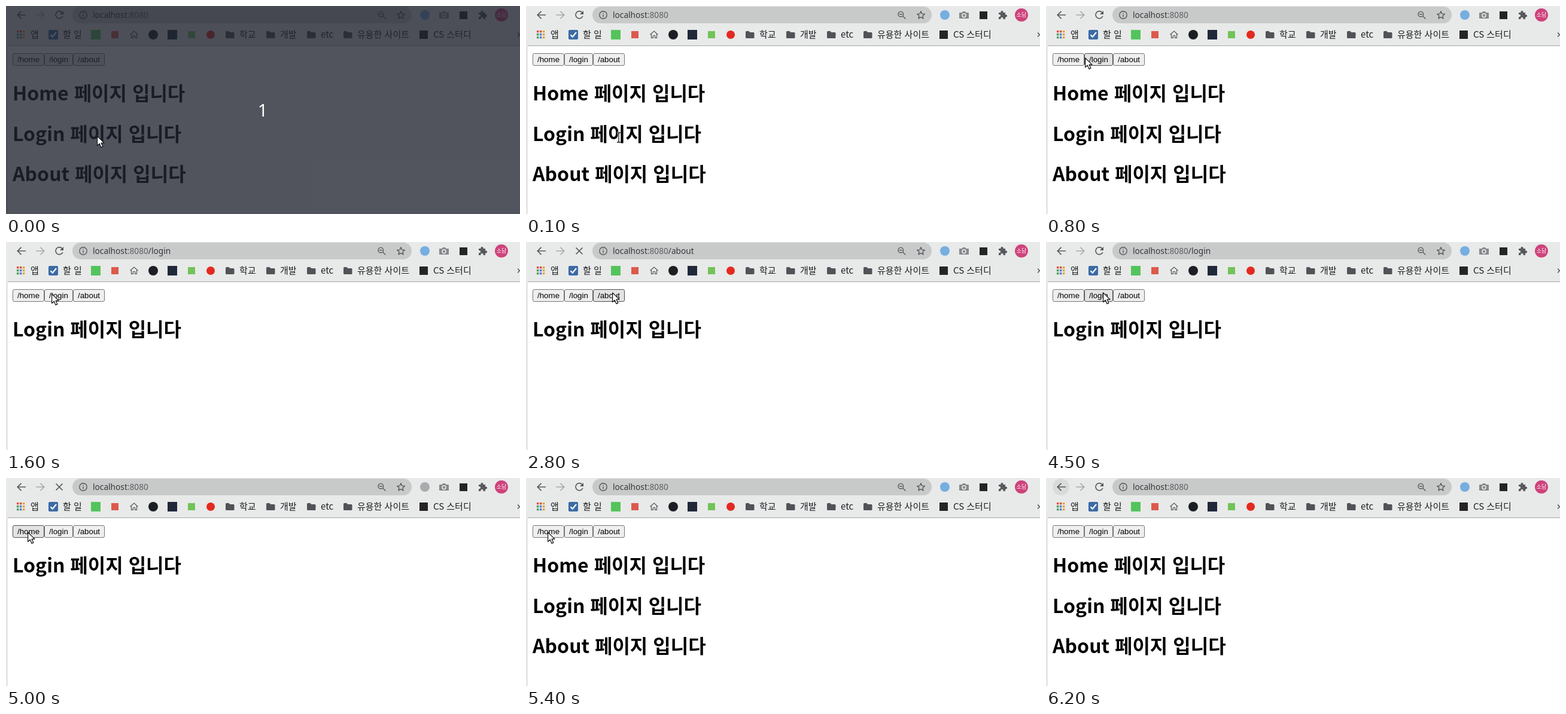
Animation of 859x348 px, one loop 6.5 s. Source, as an HTML page:

```html
<!DOCTYPE html>
<html lang="ko">
<head>
<meta charset="utf-8">
<title>Page routing</title>
<style>
  html, body { margin: 0; width: 100%; height: 100%; overflow: hidden; background: #fff; }
  svg { display: block; }
  text { white-space: pre; }
  .url { font: 13.7px "Noto Sans", sans-serif; fill: #33363a; }
  .mark { font: 15px "Noto Sans CJK KR", "Noto Sans CJK", sans-serif; fill: #1c1d1f; }
  .button { font: 13.333px "Liberation Sans", Arial, sans-serif; fill: #000; }
  .title { font: bold 32px "Noto Sans CJK KR", "Noto Sans CJK", sans-serif; fill: #000; }
  .count { font: 29px "Noto Sans", sans-serif; fill: #fff; text-anchor: middle; }
  .badge { font: 9px "Noto Sans CJK KR", "Noto Sans CJK", sans-serif; fill: #fff; text-anchor: middle; }
  .line { fill: none; stroke: #55585c; stroke-width: 1.7; }
</style>
</head>
<body>
<svg id="stage" width="859" height="348" viewBox="0 0 859 348">
  <rect width="859" height="348" fill="#fff"/>
  <rect width="3" height="348" fill="#e6e6e6"/>
  <rect width="859" height="66" fill="#e8e9e9"/>
  <rect y="66" x="3" width="856" height="1" fill="#a3a4a5"/>

  <!-- Toolbar -->
  <circle id="backHover" cx="25" cy="15" r="14" fill="#d9dada"/>
  <path class="line" d="M33 15H19.5M25.5 8.8L19.3 15L25.5 21.2"/>
  <path class="line" d="M50 15H63.5M57.5 8.8L63.7 15L57.5 21.2" style="stroke:#a9abad"/>
  <g id="reload">
    <path class="line" d="M93.6 10.7A6.1 6.1 0 1 0 94.8 17"/>
    <path d="M96 8V14H90Z" fill="#55585c"/>
  </g>
  <path id="stop" class="line" d="M83.5 9.5L94.5 20.5M94.5 9.5L83.5 20.5"/>
  <rect x="111" y="1" width="567" height="28" rx="14" fill="#c8caca"/>
  <g class="line" style="stroke-width:1.4">
    <circle cx="129" cy="15" r="6.2"/>
    <path d="M129 14V18.4M129 11.3V12.8"/>
    <circle cx="626.3" cy="13.7" r="4.3"/>
    <path d="M629.6 17L634.5 21.5M624 13.7H628.6"/>
    <path d="M660 8.8L661.8 13.1L666.4 13.5L662.9 16.5L664 21L660 18.6L656 21L657.1 16.5L653.6 13.5L658.2 13.1Z" stroke-linejoin="round"/>
  </g>
  <text class="url" x="145" y="20">localhost<tspan fill="#5c5f63">:8080</tspan><tspan id="path"></tspan></text>
  <circle id="extension" cx="700" cy="15" r="8"/>
  <path d="M725 11H728.5L730 9H734L735.5 11H739Q740 11 740 12V20Q740 21 739 21H725Q724 21 724 20V12Q724 11 725 11Z" fill="#85888b"/>
  <circle cx="732" cy="15.8" r="3" fill="#85888b" stroke="#eee" stroke-width="1.5"/>
  <rect x="758" y="9" width="13" height="13" fill="#242424"/>
  <path d="M790 11H793.5A2.2 2.2 0 1 1 797.5 11H801V14.5A2.2 2.2 0 1 1 801 18.5V22H797.5A2.2 2.2 0 1 0 793.5 22H790V18A2.1 2.1 0 1 0 790 14.3Z" fill="#56595d"/>
  <circle cx="828" cy="15" r="11" fill="#cf427b"/>
  <text class="badge" x="828" y="18.3">소담</text>

  <!-- Bookmarks -->
  <g id="apps"></g>
  <rect x="71" y="40" width="16" height="16" rx="2" fill="#3b6ba5"/>
  <path d="M74.5 48.3L77.8 51.7L84 44" fill="none" stroke="#fff" stroke-width="2.2"/>
  <rect x="142" y="40" width="16" height="16" fill="#53c45c"/>
  <rect x="176" y="42" width="12" height="12" fill="#dd5a4b"/>
  <path class="line" d="M207.5 48L214 42L220.5 48M209.5 47V53.4H212.4V49.5H215.6V53.4H218.5V47" style="stroke-width:1.2"/>
  <circle cx="246" cy="48" r="8" fill="#1b1f23"/>
  <rect x="270" y="40" width="16" height="16" fill="#20283a"/>
  <rect x="304" y="42" width="12" height="12" fill="#72c35a"/>
  <circle cx="342" cy="48" r="7" fill="#e32a20"/>
  <rect x="691" y="41" width="14" height="14" fill="#242424"/>
  <g id="folders"></g>
  <g id="marks"></g>
  <path class="line" d="M855.2 44.5L858.2 48L855.2 51.5" style="stroke-width:1.5"/>

  <!-- Page -->
  <g id="buttons"></g>
  <g id="titles"></g>

  <g id="shade">
    <rect width="859" height="348" fill="#212430" fill-opacity=".78"/>
    <text class="count" x="429" y="185">1</text>
  </g>
  <path id="arrow" d="M.6 .8V16.6L4.3 13.2L7 19.4L9.8 18.1L7.1 12.2H12Z" fill="#fff" stroke="#111" stroke-width="1.2" stroke-linejoin="round"/>
  <g id="beam" fill="none">
    <path d="M-3 -8H-1L0 -7L1 -8H3M0 -7V7M-3 8H-1L0 7L1 8H3" stroke="#fff" stroke-width="3"/>
    <path d="M-3 -8H-1L0 -7L1 -8H3M0 -7V7M-3 8H-1L0 7L1 8H3" stroke="#111" stroke-width="1.3"/>
  </g>
</svg>
<script>
const LOOP = 6500, TICK = 100;
const $ = id => document.getElementById(id);

function add(parent, tag, attrs, text = "") {
  const el = document.createElementNS("http://www.w3.org/2000/svg", tag);
  for (const key in attrs) el.setAttribute(key, attrs[key]);
  el.textContent = text;
  parent.append(el);
  return el;
}

const dotColors = ["#dd5144", "#dd5144", "#e6a93b", "#4d9c59", "#4b7fd6", "#e6a93b", "#4d9c59", "#4b7fd6", "#e6a93b"];
dotColors.forEach((fill, i) => add($("apps"), "rect", {
  x: 18 + i % 3 * 5, y: 41 + Math.floor(i / 3) * 5, width: 3.4, height: 3.4, fill
}));

for (const x of [367, 435, 503, 564]) {
  add($("folders"), "path", {
    d: `M${x} 43.5Q${x} 42 ${x + 1.5} 42H${x + 5.5}L${x + 7.2} 44H${x + 13}Q${x + 14.5} 44 ${x + 14.5} 45.5V52.5Q${x + 14.5} 54 ${x + 13} 54H${x + 1.5}Q${x} 54 ${x} 52.5Z`,
    fill: "#505357"
  });
}

[[41, "앱"], [95, "할 일"], [390, "학교"], [458, "개발"], [526, "etc"], [587, "유용한 사이트"], [714, "CS 스터디"]]
  .forEach(([x, label]) => add($("marks"), "text", { class: "mark", x, y: 53 }, label));

const buttons = [["home", 11, 53], ["login", 64, 48], ["about", 112, 53]].map(([name, x, width]) => {
  const box = add($("buttons"), "rect", { x: x + .5, y: 79.5, width: width - 1, height: 20, rx: 2.5 });
  add($("buttons"), "text", { class: "button", x: x + 8, y: 94 }, "/" + name);
  return { name, box };
});

const titles = ["Home", "Login", "About"].map(name =>
  add($("titles"), "text", { class: "title", x: 11 }, name + " 페이지 입니다"));
const baselines = [158, 226, 293];

// Pointer stops: time, x, y; stops marked 1 glide from the one before.
const stops = [
  [0, 152, 217], [100, 155, 220], [700, 63, 86, 1], [800, 65, 86], [1100, 81, 86],
  [1600, 76, 86], [1700, 76, 86], [2200, 144, 84, 1], [3400, 95, 84],
  [4600, 52, 84], [4700, 52, 84], [5000, 36, 90, 1], [5600, 36, 90], [6200, 25, -24, 1]
];

// Latest value whose time has come.
const at = (list, t) => list.filter(item => item[0] <= t).pop()[1];

const paths = [[0, ""], [1400, "/login"], [2800, "/about"], [3900, "/login"], [5000, ""]];
const pages = [[0, "all"], [1600, 1], [3000, 2], [4000, 1], [5400, "all"]];
const hovers = [[0, ""], [700, "login"], [1600, ""], [1800, "login"], [2000, "about"], [3000, ""],
  [3400, "login"], [4000, ""], [4500, "login"], [4600, "home"], [5400, ""], [5700, "home"], [5800, ""]];
const loads = [[1400, 1600], [2800, 3000], [3900, 4000], [5000, 5400]];

function pointer(t) {
  const i = stops.findLastIndex(s => s[0] <= t);
  const from = stops[i], to = stops[i + 1];
  if (!to || !to[3]) return [from[1], from[2]];
  const p = (t - from[0]) / (to[0] - from[0]);
  const ease = p * p * (3 - 2 * p);
  return [1, 2].map(k => from[k] + (to[k] - from[k]) * ease);
}

const show = (el, on) => el.setAttribute("visibility", on ? "visible" : "hidden");

function draw(time) {
  const t = Math.floor(time % LOOP / TICK) * TICK;
  const loading = loads.some(([a, b]) => t >= a && t < b);
  const page = at(pages, t), hover = at(hovers, t);

  show($("shade"), t < 100);
  show($("reload"), !loading);
  show($("stop"), loading);
  show($("backHover"), t >= 6100);
  $("path").textContent = at(paths, t);
  $("extension").setAttribute("fill", t >= 5000 && t < 5400 ? "#a9acae" : "#76aee0");

  buttons.forEach(({ name, box }) => {
    box.setAttribute("fill", name === hover ? "#e3e3e3" : "#efefef");
    box.setAttribute("stroke", name === hover ? "#4f4f4f" : "#767676");
  });
  titles.forEach((title, i) => {
    show(title, page === "all" || page === i);
    title.setAttribute("y", baselines[page === "all" ? i : 0]);
  });

  const [x, y] = pointer(t);
  const overText = t >= 100 && t < 300;
  show($("beam"), overText);
  show($("arrow"), !overText);
  for (const id of ["beam", "arrow"]) $(id).setAttribute("transform", `translate(${x} ${y})`);
}

const start = performance.now();
function loop() {
  draw(performance.now() - start);
  requestAnimationFrame(loop);
}
loop();
</script>
</body>
</html>
```
